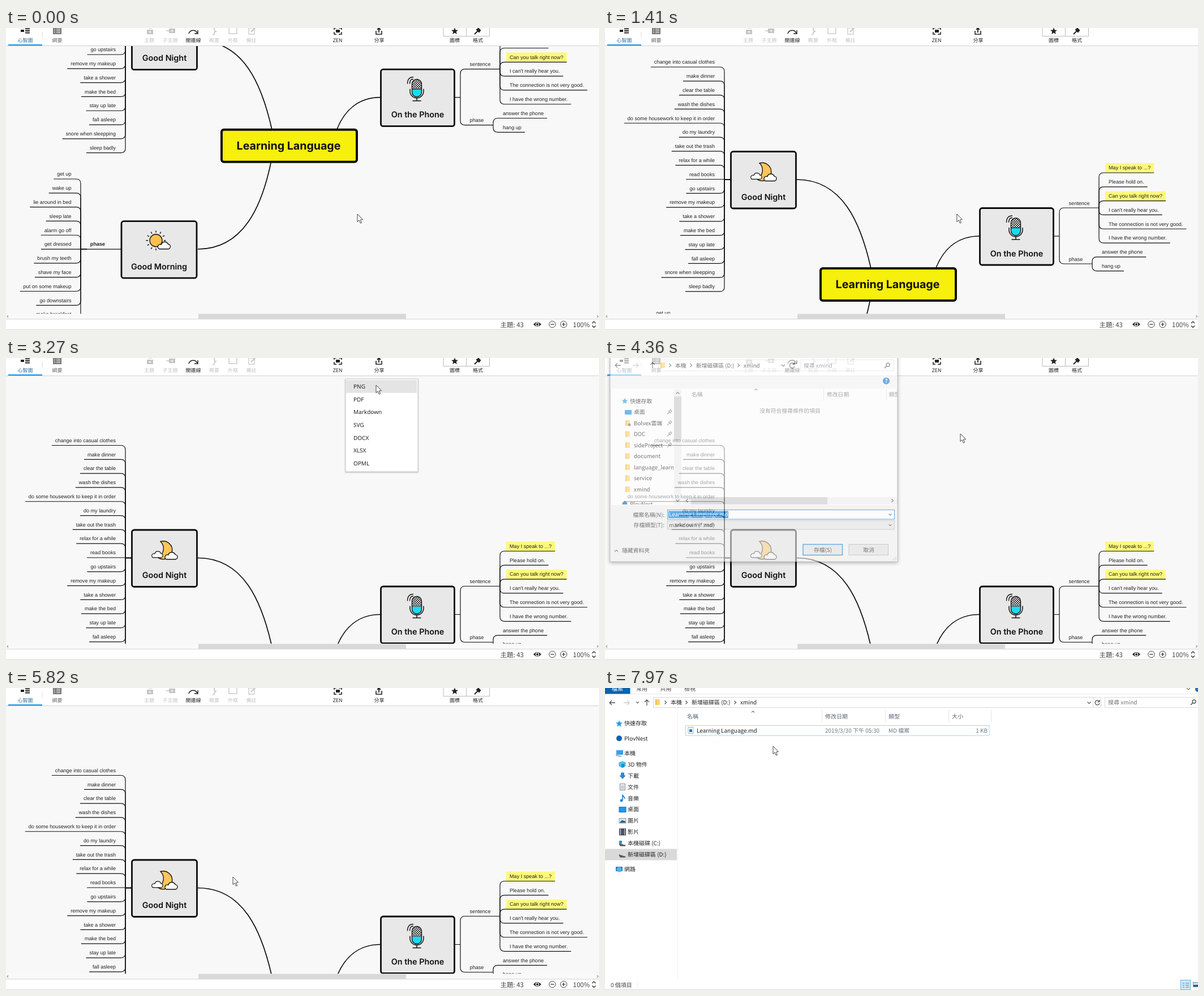
An HTML page for the animation above (8 s loop, 1048 by 534 pixels).

```html
<!DOCTYPE html>
<html lang="zh-Hant">
<head>
<meta charset="utf-8">
<title>Mind map export</title>
<style>
html, body { margin: 0; width: 100%; height: 100%; overflow: hidden; background: #fff; }
svg { display: block; width: 100%; height: 100%; }
text { font: 10px "Noto Sans CJK TC", "Noto Sans CJK", "Noto Sans", sans-serif; fill: #222; white-space: pre; text-rendering: geometricPrecision; }
.leaf { font: 9.1px "Liberation Sans", Arial, sans-serif; }
.bold { font-weight: 700; }
.topic { font: 600 14.4px Inter, sans-serif; fill: #111; }
.root { font: 700 19.6px Inter, sans-serif; fill: #111; }
.tool { font-size: 9px; }
.menu { font: 10px "Noto Sans", "Open Sans", sans-serif; }
.dlg { font-size: 9.8px; }
.zoom { font-size: 11.5px; fill: #444; }
#dialog { filter: drop-shadow(0 2px 3px #0007); }
#menu { filter: drop-shadow(0 1px 1px #0004); }
</style>
</head>
<body>
<svg id="stage" viewBox="0 0 1048 534">
  <defs>
    <clipPath id="canvasClip"><rect y="32" width="1048" height="473.5"/></clipPath>
    <clipPath id="navClip"><rect x="9" y="55" width="112" height="204"/></clipPath>
    <clipPath id="headClip"><rect x="136" y="55" width="380" height="20"/></clipPath>
    <pattern id="dots" width="4" height="4" patternUnits="userSpaceOnUse">
      <rect width="4" height="4" fill="#fff"/><path d="M0 0h2v2H0zM2 2h2v2H2z" fill="#111"/>
    </pattern>
  </defs>
  <rect width="1048" height="534" fill="#f8f8f8"/>
  <g clip-path="url(#canvasClip)"><g id="map"></g></g>
  <g id="chrome"></g>
  <g id="menu"></g>
  <g id="dialog"></g>
  <g id="explorer"></g>
  <path id="cursor" d="M0 0V13.6L3.1 10.8 5.5 16.2 7.6 15.2 5.3 10.1 9.6 9.7Z" fill="#fff" stroke="#444"/>
</svg>
<script>
const $ = id => document.getElementById(id);
const pen = document.createElement('canvas').getContext('2d');
pen.font = '9.1px "Liberation Sans", Arial, sans-serif';
const widthOf = s => pen.measureText(s).width;

const text = (x, y, s, cls = '', anchor = 'start', fill = '') =>
  `<text x="${x}" y="${y}" dy=".36em" class="${cls}" text-anchor="${anchor}"${fill && ` style="fill:${fill}"`}>${s}</text>`;
const rect = (x, y, w, h, fill, stroke = 'none', sw = 1, r = 0) =>
  `<rect x="${x}" y="${y}" width="${w}" height="${h}" rx="${r}" fill="${fill}" stroke="${stroke}" stroke-width="${sw}"/>`;
const path = (d, stroke = '#111', sw = 1.2, fill = 'none') =>
  `<path d="${d}" stroke="${stroke}" stroke-width="${sw}" fill="${fill}"/>`;
const dot = (x, y, r, fill, stroke = 'none', sw = 1) =>
  `<circle cx="${x}" cy="${y}" r="${r}" fill="${fill}" stroke="${stroke}" stroke-width="${sw}"/>`;
const place = (x, y, body, extra = '') => `<g transform="translate(${x} ${y}) ${extra}">${body}</g>`;
// Chevron pointing right at angle 0
const chevron = (x, y, angle = 0, color = '#555', size = 3) =>
  place(x, y, path(`M${-size / 2} ${-size}L${size / 2} 0L${-size / 2} ${size}`, color, 1.2), `rotate(${angle})`);
const arrow = (x, y, angle, color = '#555') =>
  place(x, y, path('M-5 0H5M1 -4L5 0L1 4', color, 1.3), `rotate(${angle})`);
const folder = (x, y) => rect(x - 4, y - 5, 8, 10, '#ffd56b') + rect(x - 4, y - 5, 2, 10, '#f0b93c');
const star = (x, y, color, k = 1) =>
  place(x, y, `<path d="M0-6 1.7-2 6-1.8 2.7 1 3.8 5.4 0 3-3.8 5.4-2.7 1-6-1.8-1.7-2Z" fill="${color}"/>`, `scale(${k})`);
const lens = (x, y) => dot(x + 1, y - 1, 3, 'none', '#555', 1.3) + path(`M${x - 1} ${y + 1}l-4 4`, '#555', 1.6);

// ---- Mind map ----
const rowGap = 24.81;
function twig(x, y, spine, mid) {
  const r = Math.min(8, Math.abs(mid - y));
  const side = Math.sign(spine - x), turn = Math.sign(mid - y);
  return path(`M${x} ${y}H${spine - side * r}Q${spine} ${y} ${spine} ${y + turn * r}V${mid}`);
}
const leftList = (items, right, top, spine) => items.map((s, i) => {
  const y = top + i * rowGap, mid = top + 9 + (items.length - 1) * rowGap / 2;
  return twig(right - widthOf(s) - 6, y + 9, spine, mid) + text(right, y, s, 'leaf', 'end');
}).join('');
const rightList = (items, left, top, spine, mid, marked = []) => items.map((s, i) => {
  const y = top + i * rowGap, w = widthOf(s);
  const mark = marked.includes(i) ? rect(left - 6, y - 8, w + 12, 16.5, '#fdf97c') : '';
  return mark + twig(left + w + 6, y + 9, spine, mid) + text(left, y, s, 'leaf');
}).join('');
const topic = (x, y, w, label) => rect(x + 1.5, y + 1.5, w - 3, 100.5, '#e8e8e8', '#0b0b0b', 2.8, 4) +
  text(x + w / 2, y + 81.5, label, 'topic', 'middle');
const cloud = (x, y, k) => place(x, y,
  path('M4.5 13H19.5a4.2 4.2 0 0 0 .6-8.4A6.5 6.5 0 0 0 7.8 5.2A4.2 4.2 0 0 0 4.5 13Z', '#111', 1.4, '#fff'), `scale(${k})`);

const moon = path('M273 239A16 16 0 1 1 268 267A17 17 0 0 0 273 239Z', '#111', 1.4, '#ffc55a') +
  cloud(256, 256, .88) + cloud(279, 257.5, 1);
const rays = Array.from({ length: 12 }, (_, i) => place(0, 0, path('M14 0H17.5', '#111', 1.4), `rotate(${i * 30})`)).join('');
const sun = place(265, 621, rays + dot(0, 0, 11, '#ffc04f', '#111', 1.4)) + cloud(266.5, 623, 1);
const mic = place(726, 336, rect(-8.5, 0, 17, 31, '#fff', 'none', 0, 8.5) +
  `<path d="M-8.5 17V8.5a8.5 8.5 0 0 1 17 0V17Z" fill="url(#dots)"/>` +
  `<path d="M-8.5 18h17V22.5a8.5 8.5 0 0 1-17 0Z" fill="#19dcf2"/>` +
  rect(-8.5, 0, 17, 31, 'none', '#111', 1.4, 8.5) + path('M-8.5 17.5H8.5') +
  path('M-12 17V21a12 12 0 0 0 24 0V17M0 33V38M-7.5 38H7.5', '#111', 1.5) +
  path('M-16.5 8Q-16.5-4-6-4M-12.5 8Q-12.5-0.5-6-0.5', '#111', 1.4));

$('map').innerHTML =
  path('M339 268C420 268 452 345 470 425M339 636.3C420 636 452 560 468 484M662 368C622 368 598 392 585 424', '#0b0b0b', 1.7) +
  path('M210 268H222M132 636.5H203M132 636.5H143', '#111', 1.3) + path('M132 636.5H143M210 268H222', '#111', 1.8) +
  leftList(['change into casual clothes', 'make dinner', 'clear the table', 'wash the dishes',
    'do some housework to keep it in order', 'do my laundry', 'take out the trash', 'relax for a while', 'read books',
    'go upstairs', 'remove my makeup', 'take a shower', 'make the bed', 'stay up late', 'fall asleep',
    'snore when sleepping', 'sleep badly'], 194, 60, 211) +
  leftList(['get up', 'wake up', 'lie around in bed', 'sleep late', 'alarm go off', 'get dressed', 'brush my teeth',
    'shave my face', 'put on some makeup', 'go downstairs', 'make breakfast'], 115.5, 503.3, 132) +
  text(162, 627.3, 'phase', 'leaf bold', 'middle') +
  topic(221, 217, 118, 'Good Night') + moon +
  topic(202.5, 585.5, 136, 'Good Morning') + sun +
  path('M793 368H803') + twig(873, 318, 803, 368) + twig(861, 417, 803, 368) +
  text(838, 309.3, 'sentence', 'leaf', 'middle') + text(832, 408.5, 'phase', 'leaf', 'middle') +
  rightList(['May I speak to ...?', 'Please hold on.', 'Can you talk right now?', "I can't really hear you.",
    'The connection is not very good.', 'I have the wrong number.'], 890, 247, 873, 318, [0, 2]) +
  rightList(['answer the phone', 'hang up'], 878, 395.8, 861, 417) +
  topic(661, 317, 133, 'On the Phone') + mic +
  rect(381, 425, 239, 57, '#f7ef0c', '#0b0b0b', 4, 4) + text(499.5, 452.8, 'Learning Language', 'root', 'middle');

// ---- Toolbar and status bar ----
const pale = '#c4c4c4', dark = '#222';
const label = (x, s, color) => text(x, 22, s, 'tool', 'middle', color);
$('chrome').innerHTML =
  rect(0, 0, 1048, 31, '#fff') + path('M0 31.5H1048', '#d2d2d2', 1) + rect(4, 29, 60, 2.2, '#1e97e8') + path('M64 7V17', '#ddd', 1) +
  rect(26, 3, 6, 4, dark) + path('M34 1.5H42M34 5H42M34 8.5H42', dark, 1.8) + label(34, '心智圖', '#2a6d9c') +
  rect(83, -2, 15, 13, '#777') + path('M85 2H87M89 2H96M85 5H87M89 5H96M85 8H87M89 8H96', '#fff', 1.1) + label(90.5, '綱要', '#666') +
  rect(249, 3, 11, 8, pale) + path('M254.5 5V9M252.5 7H256.5', '#fff', 1) + path('M252 0H258', pale, 1.5) + label(253, '主題', pale) +
  rect(288, 1, 11, 8, pale) + path('M293.5 3V7M291.5 5H295.5', '#fff', 1) + path('M283 5H288', pale, 1.5) + label(290, '子主題', pale) +
  path('M323 10A8 8 0 0 1 338 9M339 4V10H333', dark, 1.5) + label(331, '關連線', dark) +
  path('M365 -1Q369 -1 368 3Q368 5 371 6Q368 7 368 9Q369 12 365 12', pale, 1.5) + label(368, '概要', pale) +
  rect(394, -1, 14, 11, 'none', pale, 1.3) + label(401, '外框', pale) +
  rect(429, 0, 10, 11, 'none', pale, 1.2) + path('M433 7L441 -1', pale, 2) + label(433.5, '備註', pale) +
  path('M580 3V0H584M588 0H593V3M593 7V11H588M584 11H580V7', dark, 1.6) + rect(583, 3, 7, 5, dark) + label(586, 'ZEN', dark) +
  path('M654 5V11H664V5', dark, 1.6) + path('M659 8V0M656 3L659 0L662 3', dark, 1.8) + label(659.5, '分享', dark) +
  rect(773, -3, 81.5, 17.5, '#fff', '#bbb') + path('M813.5 0V14', '#bbb', 1) + star(793, 5.5, dark) +
  path('M828 11L834 5', dark, 2) + path('M831 3L836 8L839 4L835 0Z', dark, 1, dark) +
  label(793, '圖標', dark) + label(834, '格式', dark) +
  rect(0, 505.5, 1048, 9.5, '#f9f9f9') + rect(340, 505.5, 367, 9, '#d8d8d8') + chevron(3, 510, 180, '#999', 2) + chevron(1045.5, 510, 0, '#999', 2) +
  rect(0, 515, 1048, 19, '#fff') + path('M0 514.8H1048M0 533.5H1048', '#d4d4d4', 1) +
  text(915, 524.5, '主題: 43', 'zoom', 'end') + text(1002, 524.5, '100%', 'zoom') +
  path('M933 524Q939 517.5 945 524Q939 530.5 933 524Z', dark, 1.4, dark) + dot(939, 524, 2.6, dark, '#fff', 1.2) +
  dot(965.5, 524, 5.7, '#fff', '#444') + path('M962.5 524H968.5', '#222', 1.2) +
  dot(985.5, 524, 5.7, '#fff', '#444') + path('M982.5 524H988.5M985.5 521V527', '#222', 1.2) +
  chevron(1039, 520.5, -90, '#222') + chevron(1039, 528, 90, '#222');

// ---- Export menu ----
const rowHeight = 22.7;
$('menu').innerHTML = rect(600, 37, 128, 164, '#fff', '#ccc') +
  `<rect id="menuHover" x="601" width="125" height="${rowHeight}" fill="#e4e4e4"/>` +
  ['PNG', 'PDF', 'Markdown', 'SVG', 'DOCX', 'XLSX', 'OPML'].map((s, i) => text(614, 39 + (i + .5) * rowHeight, s, 'menu')).join('');

// ---- Save dialog ----
const grey = '#70757d';
const folders = ['DOC', 'sideProject', 'document', 'language_learn', 'service', 'xmind'];
const crumbs = (y, cls, xs) => ['本機', '新增磁碟區 (D:)', 'xmind'].map((s, i) => chevron(xs[i] - 9, y, 0) + text(xs[i], y, s, cls)).join('');
const pin = y => place(114, y, path('M-4 4L0 0M-2-2L2 2M-1-1L2-4L4-2L1 1', '#888', 1.2));
$('dialog').innerHTML =
  rect(9, -40, 508, 400, '#fff', '#8a8a8a') + rect(9.5, 32, 507, 22, '#f5f6f7') + rect(9.5, 260, 507, 99.5, '#f0f0f0') +
  arrow(23, 13, 180) + arrow(54, 13, 0, '#bbb') + arrow(84, 13, -90) + rect(95, 3, 240, 20, '#fff', '#ddd') + folder(102, 13) +
  crumbs(13, 'dlg', [124, 161, 245]) + chevron(315, 13, 90) + path('M334 10A4.5 4.5 0 1 0 335 15M335 7V11H331', '#555', 1.3) +
  rect(346, 3, 164, 20, '#fff', '#ddd') + text(351, 13, '搜尋 xmind', 'dlg', 'start', grey) + lens(499, 13) +
  dot(497, 40.5, 6, '#1979ca') + text(497, 40.5, '?', 'dlg bold', 'middle', '#fff') +
  `<g clip-path="url(#navClip)">` + star(35, 76, '#3499e0', .9) + text(44, 76, '快速存取', 'dlg') +
  rect(35, 92, 12, 8, '#1a8fe6') + text(51, 95.5, '桌面', 'dlg') + folder(40, 115) + dot(43, 118, 2.5, '#777') + text(51, 115, 'Bolvex雲端', 'dlg') +
  folders.map((s, i) => folder(40, 134.5 + i * 19.5) + text(51, 134.5 + i * 19.5, s, 'dlg')).join('') +
  dot(35, 258, 4.5, '#0f6cbd') + text(44, 258, 'PlovNest', 'dlg') + '</g>' +
  [95.5, 115, 134.5, 154].map(pin).join('') +
  rect(122, 55, 13, 204, '#f0f0f0') + rect(122, 68, 13, 78, '#cdcdcd') + chevron(128.5, 62, -90) + chevron(128.5, 252, 90) +
  chevron(267, 56, -90, '#888', 2.5) + path('M386.5 54V75M497.5 54V75', '#e2e2e2', 1) +
  `<g clip-path="url(#headClip)">` + text(153, 64, '名稱', 'dlg', 'start', grey) + text(392, 64, '修改日期', 'dlg', 'start', grey) +
  text(501.5, 64, '類型', 'dlg', 'start', grey) + '</g>' + text(327, 93.5, '沒有符合搜尋條件的項目', 'dlg', 'middle', grey) +
  rect(137, 246, 379, 13, '#f0f0f0') + rect(152, 246, 241, 13, '#cdcdcd') + chevron(145, 252, 180) + chevron(508, 252, 0) +
  text(105, 277, '檔案名稱(N):', 'dlg', 'end') + rect(110.5, 268.5, 401, 16.5, '#fff', '#0078d7') + rect(112, 270.5, 106, 12.5, '#0078d7') +
  text(113, 276.8, 'Learning Language.md', 'dlg', 'start', '#fff') + chevron(504, 277, 90, '#555', 2.5) +
  text(105, 295.5, '存檔類型(T):', 'dlg', 'end') + rect(110.5, 287.5, 401, 15.5, '#e5e5e5', '#b5b5b5') +
  text(113, 295.5, 'markdown (*.md)', 'dlg') + chevron(504, 295.5, 90, '#555', 2.5) +
  chevron(20, 341, -90) + text(30, 340.5, '隱藏資料夾', 'dlg') +
  `<rect id="save" x="350" y="329.5" width="69.5" height="19" stroke="#0078d7" stroke-width="1.4"/>` + text(385, 339, '存檔(S)', 'dlg', 'middle') +
  rect(431, 329.5, 69.5, 19, '#e1e1e1', '#adadad') + text(466, 339, '取消', 'dlg', 'middle') + path('M508 358L515 351M512 358L515 355', '#aaa', 1);

// ---- File explorer ----
const monitor = (x, y, c) => rect(x - 6, y - 4, 12, 8, c);
const disk = y => path(`M25 ${y - 1}L34 ${y + 2}H36V${y + 4}H27L25 ${y + 1}Z`, '#777', .6, '#555');
const sidebar = [
  [34, 62.5, '快速存取', star(25, 63, '#2f9ae6')],
  [34, 89, 'PlovNest', dot(25, 89, 5, '#0f5fb0')],
  [34, 115.5, '本機', monitor(26, 114, '#3aa0e8') + path('M19 119L29 121', '#888', 1.5)],
  [40, 135.5, '3D 物件', path('M31 130L36 132V138L31 141L25 138V132Z', '#1593cf', .8, '#53c4f0') + rect(29, 134, 5, 6, '#1593cf')],
  [40, 155, '下載', path('M28.5 150H33.5V155H36L31 160.5L26 155H28.5Z', '#2a7dc9', .8, '#2f86d4')],
  [40, 175, '文件', rect(26.5, 169.5, 9, 11, '#f8f8f8', '#888') + path('M28 173H34M28 175.5H34M28 178H34', '#6f9fc0', 1)],
  [40, 195, '音樂', dot(29, 199, 2.4, '#1a83d8') + path('M31 199V189.5Q34 192 35 196', '#1a83d8', 1.7)],
  [40, 214.5, '桌面', rect(25, 210.5, 12, 9, '#1a9af0', '#1273c0')],
  [40, 234.5, '圖片', rect(25, 230.5, 12, 8.5, '#cfe6f5', '#888', .8) + path('M26 238L30 234L36 236V238Z', '#2b5c80', .5, '#2b5c80')],
  [40, 254.5, '影片', rect(25.5, 249, 11, 11, '#4c5566', '#222') + path('M27 249V260M35 249V260', '#ddd', 1.2, 'none')],
  [40, 274.5, '本機磁碟 (C:)', disk(275.5) + rect(25, 270, 5, 5, '#1a9af0')],
  [40, 294.5, '新增磁碟區 (D:)', disk(295.5)],
  [34, 320.5, '網路', monitor(25, 320, '#2f7fc0') + dot(25, 321, 4.5, '#5cb0e4')],
];
$('explorer').innerHTML = rect(0, 0, 1048, 534, '#fff') +
  rect(0, 0, 44.5, 10.5, '#0b63ab') + text(22, 1, '檔案', '', 'middle', '#fff') +
  [['常用', 65], ['共用', 107.5], ['檢視', 150]].map(([s, x]) => text(x, 1, s, '', 'middle', '#444')).join('') +
  chevron(1031, 1.5, 90, '#777') + dot(1048, 2, 5, '#1473c5') + path('M45 10.5H1048', '#e8e8e8', 1) +
  arrow(13, 26, 180) + arrow(38, 26, 0, '#ccc') + chevron(57.5, 25.5, 90, '#555', 2.3) + arrow(74, 26, -90) +
  rect(85.5, 16.5, 791, 18, '#fff', '#d9d9d9') + path('M862.5 17V34', '#d9d9d9', 1) + folder(93, 25) + crumbs(25.5, '', [116, 153, 239]) +
  chevron(855.5, 26, 90) + path('M873 23A4 4 0 1 0 874 27M874 21V24.5H870.5', '#555', 1.3) +
  rect(883.5, 16.5, 170, 18, '#fff', '#d9d9d9') + text(889, 25.5, '搜尋 xmind', '', 'start', grey) + lens(1040, 25) +
  [['名稱', 145], ['修改日期', 389], ['類型', 501], ['大小', 613]].map(([s, x]) => text(x, 50, s, '', 'start', '#5c6573')).join('') +
  path('M383.5 39V61M495.5 39V61M607.5 39V61M682.5 39V61', '#e6e6e6', 1) + chevron(261.5, 42, -90, '#777', 2.5) +
  path('M128.5 40V515', '#f0f0f0', 1) + rect(0, 284.5, 127, 20, '#d9d9d9') +
  sidebar.map(([x, y, s, icon]) => icon + text(x, y, s)).join('') +
  rect(142.5, 66.5, 536.5, 17.5, '#fff', '#a3d5f7') + rect(147, 69.5, 9, 11, '#fff', '#999', .8) + rect(149, 73, 5, 5, '#1a7fc4') +
  text(162, 75.3, 'Learning Language.md') + text(389, 75.3, '2019/3/30 下午 05:30', '', 'start', grey) +
  text(501, 75.3, 'MD 檔案', '', 'start', grey) + text(676, 75.3, '1 KB', '', 'end', grey) +
  text(10, 525, '0 個項目', '', 'start', '#444') + path('M57.5 520V531', '#eee', 1) +
  rect(1017.5, 516.5, 17, 17, '#cfe9fa', '#5fb2e8') + path('M1021 522H1024M1026 522H1032M1021 525.5H1024M1026 525.5H1032M1021 529H1024M1026 529H1032', '#777', 1.2) +
  rect(1039.5, 520.5, 12, 8, '#bfe0f5', '#777', .8) + rect(1040, 525, 8, 3, '#2b5c80') + path('M0 533.5H1017', '#d4d4d4', 1);

// ---- Motion ----
// Screen refreshes come in bursts: first, last, count
const bursts = [[770, 1560, 11], [1640, 2400, 11], [2470, 3270, 11], [3340, 3570, 4], [3800, 3880, 2], [4190, 4950, 11],
  [5030, 5270, 4], [5430, 5820, 6], [5980, 6730, 11], [6820, 7300, 7], [7530, 7970, 7]];
const lastRefresh = t => bursts.reduce((shown, [first, last, count]) => {
  if (t < first) return shown;
  const step = (last - first) / (count - 1);
  return Math.min(last, first + Math.floor((t - first) / step + .1) * step);
}, 0);
function tween(keys, t) {
  const i = keys.findIndex(k => k[0] > t);
  if (i === 0) return keys[0].slice(1);
  if (i < 0) return keys[keys.length - 1].slice(1);
  const [a, b] = [keys[i - 1], keys[i]], p = (t - a[0]) / (b[0] - a[0]);
  return a.slice(1).map((v, k) => v + (b[k + 1] - v) * p);
}
const scroll = [[690, -245.3], [1007, -152.7], [1402, 0], [1640, 85.5]];
const pointer = [[0, 621, 329], [1640, 622, 329], [1720, 622, 325], [2096, 628, 120], [2400, 642, 35], [2630, 655, 8],
  [2870, 656, 8], [3270, 654, 48], [3570, 654, 90], [4110, 654, 90], [4342, 628, 134], [4494, 628, 134],
  [4950, 418, 314], [5270, 401, 334], [5905, 401, 334], [6730, 446, 455], [7300, 438, 479], [7450, 438, 479], [7970, 297, 103]];
const menuFade = [[2710, 0], [2790, 1], [3720, 1], [3880, 0]];
const dialogPose = [[4110, 0, .9], [4190, .15, .93], [4342, .6, 1], [4494, 1, 1.02], [5430, 1, 1.02], [5586, .95, 1.01], [5820, 0, .93]];
const explorerPose = [[6740, 0, .9], [6820, .1, .92], [6980, .6, .97], [7140, 1, 1]];

function pose(id, keys, t, cx, cy) {
  const [opacity, k] = tween(keys, t), el = $(id);
  el.setAttribute('opacity', opacity);
  el.setAttribute('visibility', opacity ? 'visible' : 'hidden');
  if (k) el.setAttribute('transform', `translate(${cx} ${cy}) scale(${k}) translate(${-cx} ${-cy})`);
}
function draw(now) {
  const t = lastRefresh(now % 8000);
  const [x, y] = tween(pointer, t);
  $('map').setAttribute('transform', `translate(0 ${tween(scroll, t)[0]})`);
  $('cursor').setAttribute('transform', `translate(${x} ${y})`);
  const row = Math.floor((y - 39) / rowHeight);
  $('menuHover').setAttribute('y', 39 + row * rowHeight);
  $('menuHover').setAttribute('opacity', row >= 0 && row < 7 ? 1 : 0);
  $('save').setAttribute('fill', t >= 5430 ? '#cce4f7' : t >= 5100 ? '#e5f1fb' : '#e1e1e1');
  pose('menu', menuFade, t);
  pose('dialog', dialogPose, t, 263, 150);
  pose('explorer', explorerPose, t, 524, 534);
}
const begin = performance.now();
function loop() {
  draw(performance.now() - begin);
  requestAnimationFrame(loop);
}
loop();
</script>
</body>
</html>
```
